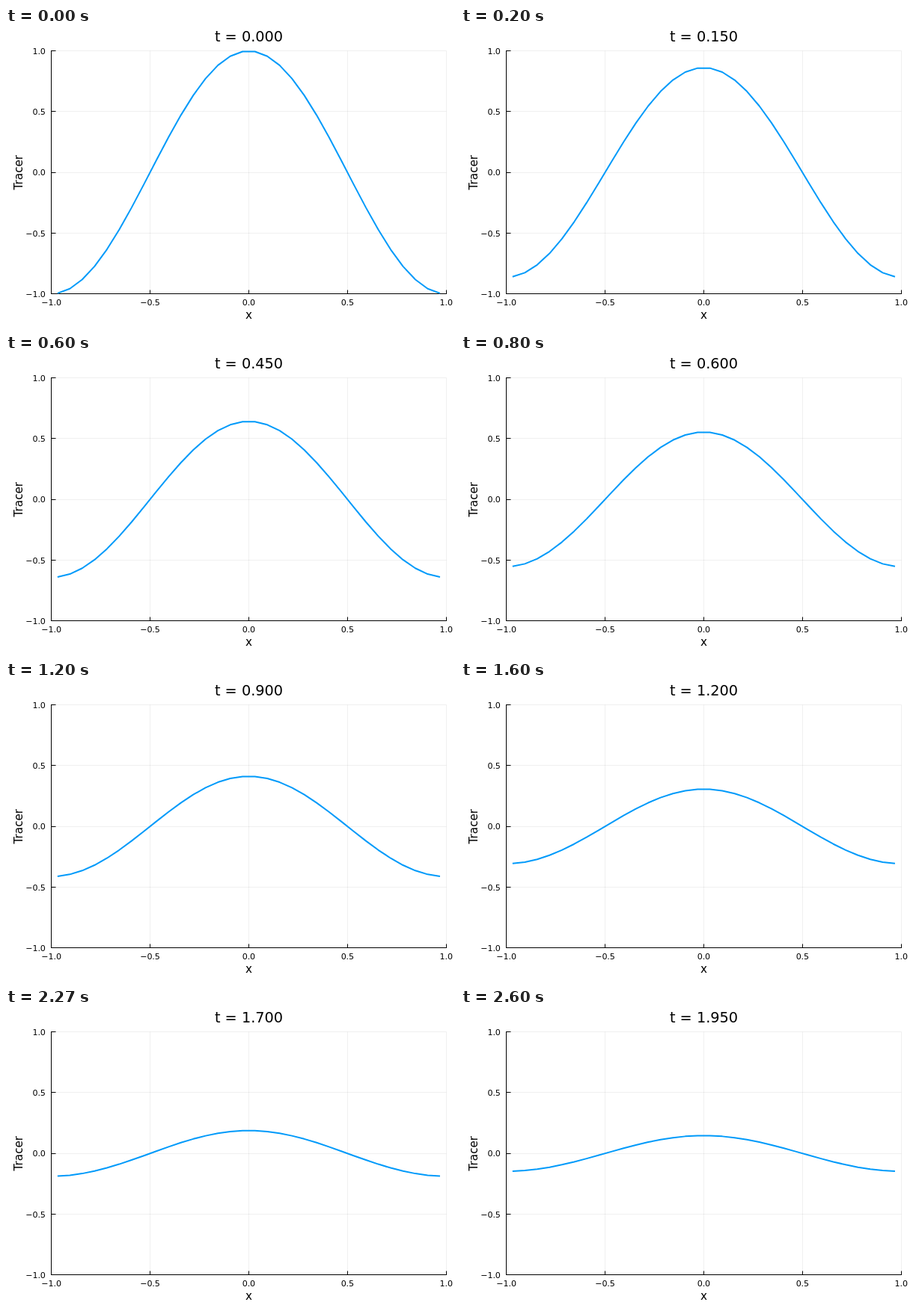
Write an HTML page that moves like this. It is 600x400 px and loops after 2.67 s.

```html
<!DOCTYPE html>
<html lang="en">
<head>
<meta charset="utf-8">
<title>Tracer</title>
<style>
  html, body { margin: 0; width: 100%; height: 100%; overflow: hidden; background: #fff; }
  svg { display: block; width: 600px; height: 400px; }
  text { font-family: "DejaVu Sans", sans-serif; text-anchor: middle; fill: #000; }
  .tick { font-size: 11.1px; letter-spacing: -0.1px; }
  .end { text-anchor: end; }
  .guide { font-size: 15.2px; }
  .title { font-size: 19.3px; }
  .grid { stroke: #000; stroke-opacity: 0.06; }
  .axis { stroke: #000; }
  #curve { fill: none; stroke: #009afa; stroke-width: 2; stroke-linejoin: round; }
</style>
</head>
<body>
<svg viewBox="0 0 600 400">
  <g id="axes"></g>
  <polyline id="curve"/>
  <text id="title" class="title" x="324.5" y="18"></text>
  <text class="guide" x="324.5" y="388.7">x</text>
  <text class="guide" transform="translate(22 193.2) rotate(-90)">Tracer</text>
</svg>
<script>
const LOOP = 2670, STEP = 200 / 3, DT = 0.05;
const CELLS = 32, DX = 2 / CELLS, KAPPA = 0.1;
// Decay rate of the cosine mode under second-order diffusion
const RATE = KAPPA * (2 - 2 * Math.cos(Math.PI * DX)) / DX ** 2;

const px = x => 324.4 + 263.8 * x;
const py = y => 193.2 - 162.5 * y;
const snap = v => Math.floor(v) + 0.5;
const $ = id => document.getElementById(id);

function add(tag, attrs, text = '') {
  const el = document.createElementNS($('axes').namespaceURI, tag);
  for (const k in attrs) el.setAttribute(k, attrs[k]);
  el.textContent = text;
  $('axes').append(el);
}
const line = (cls, x1, y1, x2, y2) => add('line', { class: cls, x1, y1, x2, y2 });

const ticks = [-1, -0.5, 0, 0.5, 1];
const [left, right, top_, bottom] = [snap(px(-1)), snap(px(1)), snap(py(1)), snap(py(-1))];

for (const v of ticks) {
  line('grid', snap(px(v)), top_, snap(px(v)), bottom);
  line('grid', left, snap(py(v)), right, snap(py(v)));
}
line('axis', left, top_ - 0.5, left, bottom + 0.5);
line('axis', left - 0.5, bottom, right + 0.5, bottom);
for (const v of ticks) {
  const x = snap(px(v)), y = snap(py(v));
  const label = v.toFixed(1).replace('-', '\u2212');
  line('axis', x, bottom, x, bottom - 5);
  line('axis', left, y, left + 6, y);
  add('text', { class: 'tick', x: px(v), y: 371 }, label);
  add('text', { class: 'tick end', x: 52.8, y: py(v) + 4.2 }, label);
}

let shown = -1;
function draw() {
  const ms = Math.floor(performance.now() % LOOP / 10) * 10;
  const step = Math.floor((ms + 5) / STEP);
  if (step !== shown) {
    shown = step;
    const t = step * DT, amp = Math.exp(-RATE * t);
    const pts = Array.from({ length: CELLS }, (_, i) => {
      const x = -1 + (i + 0.5) * DX;
      return px(x).toFixed(2) + ',' + py(amp * Math.cos(Math.PI * x)).toFixed(2);
    });
    $('curve').setAttribute('points', pts.join(' '));
    $('title').textContent = 't = ' + t.toFixed(3);
  }
  requestAnimationFrame(draw);
}
draw();
</script>
</body>
</html>
```
